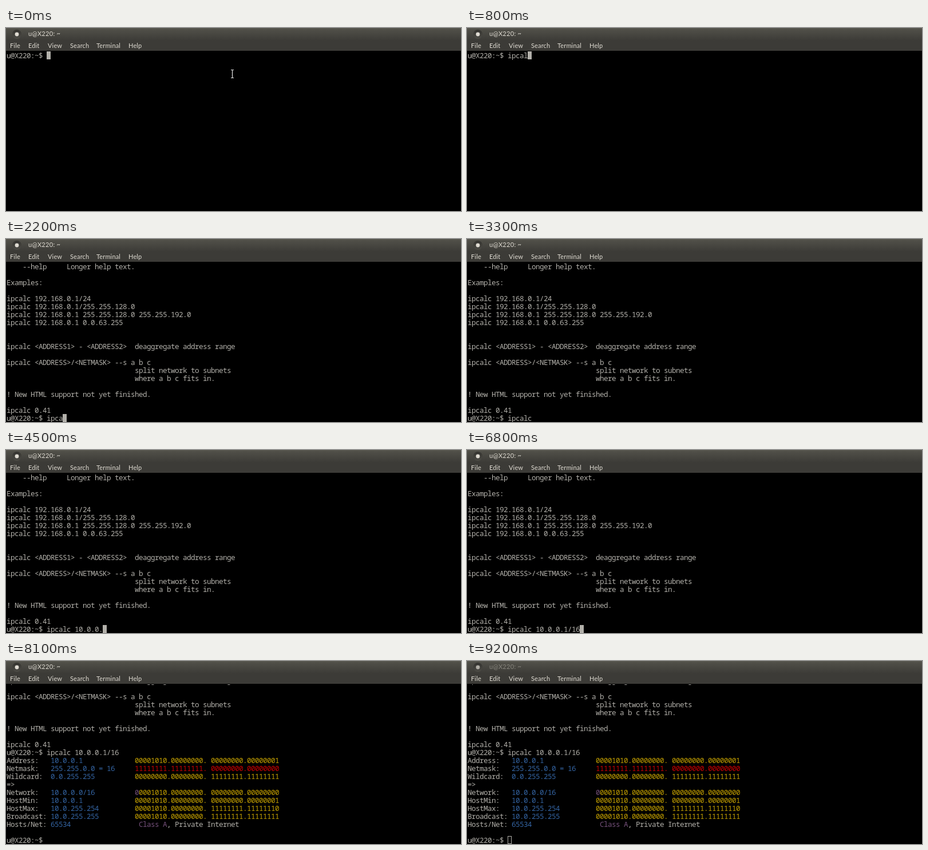
Animation, 795 px wide and 321 px high, one loop 9400 ms. Source, as an HTML page:

```html
<!DOCTYPE html>
<html lang="en">
<head>
<meta charset="utf-8">
<title>Terminal</title>
<style>
  html, body { margin: 0; width: 100%; height: 100%; overflow: hidden; background: #000; }
  svg { display: block; width: 795px; height: 321px; }
  .mono { font: 12.6px "Noto Sans Mono", "DejaVu Sans Mono", monospace; }
  .ui { font: 11px Lato, "Open Sans", sans-serif; letter-spacing: .15px; fill: #dfdbd2; }
</style>
</head>
<body>
<svg viewBox="0 0 795 321">
  <defs>
    <linearGradient id="bar" x1="0" y1="0" x2="0" y2="1">
      <stop offset="0" stop-color="#595850"/>
      <stop offset=".12" stop-color="#504f48"/>
      <stop offset="1" stop-color="#3c3b37"/>
    </linearGradient>
    <linearGradient id="knob" x1="0" y1="0" x2="0" y2="1">
      <stop offset="0" stop-color="#33322e"/>
      <stop offset="1" stop-color="#4d4c46"/>
    </linearGradient>
    <clipPath id="view"><rect y="41" width="795" height="280"/></clipPath>
  </defs>
  <rect width="795" height="321"/>
  <g class="mono" clip-path="url(#view)">
    <g id="start"></g>
    <g id="help"></g>
    <g id="result"></g>
    <rect id="cursor" width="7" height="14"/>
  </g>
  <rect width="795" height="40" fill="#3c3b37"/>
  <rect id="titlebar" width="795" height="22" fill="url(#bar)"/>
  <circle cx="19" cy="11" r="8" fill="url(#knob)"/>
  <circle id="dot" cx="19" cy="11" r="3.4" fill="#dfdbd2"/>
  <g class="ui">
    <text id="title" x="39" y="14" style="letter-spacing:.3px">u@X220: ~</text>
    <g id="menu"></g>
  </g>
  <g id="beam" fill="none">
    <path d="M-2.5 -7h2l.5 .5 .5 -.5h2M0 -6.5V6.5M-2.5 7h2l.5 -.5 .5 .5h2" stroke="#e6e6e6" stroke-width="1.2"/>
  </g>
  <path id="arrow" d="M0 0V15L3.6 11.7 6 17 8.4 16 6.1 10.9H11Z" fill="#fff" stroke="#000"/>
</svg>
<script>
const LOOP = 9400, CW = 7, LH = 14, TOP = 41;
const GREY = '#b2b0aa', BLUE = '#3465a4', GOLD = '#c4a000', RED = '#cc0000', PLUM = '#75507b';
const PROMPT = 'u@X220:~$ ';
const $ = id => document.getElementById(id);

function label(parent, x, y, text, fill) {
  const el = document.createElementNS('http://www.w3.org/2000/svg', 'text');
  el.setAttribute('x', x);
  el.setAttribute('y', y);
  if (fill) el.setAttribute('fill', fill);
  el.textContent = text;
  return parent.appendChild(el);
}

// Puts each word on the character grid.
function put(parent, row, col, text, fill = GREY) {
  for (const m of text.matchAll(/\S+/g)) {
    const xs = [...m[0]].map((_, i) => 1 + (col + m.index + i) * CW);
    label(parent, xs.join(' '), TOP + row * LH + 12, m[0], fill);
  }
}

function command(parent, row, text, times) {
  put(parent, row, 0, PROMPT);
  const chars = [...text].map((c, i) =>
    label(parent, 1 + (PROMPT.length + i) * CW, TOP + row * LH + 12, c, GREY));
  return { chars, times, row };
}

// Shows the typed part and returns its length.
function type({ chars, times }, t) {
  chars.forEach((c, i) => show(c, t >= times[i]));
  return times.filter(k => t >= k).length;
}

function show(el, on) { el.style.display = on ? '' : 'none'; }

[['File', 7], ['Edit', 39], ['View', 73], ['Search', 112], ['Terminal', 158], ['Help', 214]]
  .forEach(([name, x]) => label($('menu'), x, 35, name));

const indent = ' '.repeat(32);
`    --help     Longer help text.

Examples:

ipcalc 192.168.0.1/24
ipcalc 192.168.0.1/255.255.128.0
ipcalc 192.168.0.1 255.255.128.0 255.255.192.0
ipcalc 192.168.0.1 0.0.63.255


ipcalc <ADDRESS1> - <ADDRESS2>  deaggregate address range

ipcalc <ADDRESS>/<NETMASK> --s a b c
${indent}split network to subnets
${indent}where a b c fits in.

! New HTML support not yet finished.

ipcalc 0.41`.split('\n').forEach((line, row) => put($('help'), row, 0, line));

const first = command($('start'), 0, 'ipcalc', [300, 400, 500, 700, 800, 900]);
const second = command($('help'), 19, 'ipcalc 10.0.0.1/16',
  [1800, 2000, 2000, 2200, 2400, 2500, 2800, 3500, 3600, 3800, 4000,
   4300, 4400, 4500, 5300, 6200, 6500, 6800]);

const out = $('result');
const Z = '00000000', F = '11111111', TEN = '00001010';
[
  ['Address:', '10.0.0.1', [TEN, Z, Z, '00000001']],
  ['Netmask:', '255.255.0.0 = 16', [F, F, Z, Z], RED],
  ['Wildcard:', '0.0.255.255', [Z, Z, F, F]],
  ['=>'],
  ['Network:', '10.0.0.0/16', [TEN, Z, Z, Z]],
  ['HostMin:', '10.0.0.1', [TEN, Z, Z, '00000001']],
  ['HostMax:', '10.0.255.254', [TEN, Z, F, '11111110']],
  ['Broadcast:', '10.0.255.255', [TEN, Z, F, F]],
  ['Hosts/Net:', '65534']
].forEach(([name, value = '', bits, color = GOLD], i) => {
  const row = 9 + i;
  put(out, row, 0, name);
  put(out, row, 11, value, BLUE);
  if (!bits) return;
  const text = `${bits[0]}.${bits[1]}. ${bits[2]}.${bits[3]}`;
  const lead = name === 'Network:' ? 1 : 0;
  put(out, row, 32, text.slice(0, lead), PLUM);
  put(out, row, 32 + lead, text.slice(lead), color);
});
put(out, 17, 33, 'Class A', PLUM);
put(out, 17, 40, ', Private Internet');
put(out, 19, 0, PROMPT);

const blinks = [[3300, 3500], [5100, 5300], [5800, 6200], [7700, 8300], [8900, 9200]];

function drawCursor(t, row, typed, focused) {
  const c = $('cursor'), inset = focused ? 0 : .5;
  c.setAttribute('x', 1 + (PROMPT.length + typed) * CW + inset);
  c.setAttribute('y', TOP + row * LH + inset);
  c.setAttribute('width', CW - 2 * inset);
  c.setAttribute('height', LH - 2 * inset);
  c.setAttribute('fill', focused ? GREY : 'none');
  c.setAttribute('stroke', focused ? 'none' : GREY);
  show(c, !blinks.some(([a, b]) => t >= a && t < b));
}

function drawPointer(t) {
  const leaving = t >= 7500 && t < 8100;
  const p = leaving ? Math.floor((t - 7500) / 100) / 5 : 0;
  const x = 395.5 + 20 * p, y = 80.5 - 76 * p * (.6 + .4 * p);
  const visible = t < 200 || leaving;
  for (const id of ['beam', 'arrow']) {
    $(id).setAttribute('transform', `translate(${x} ${y})`);
    show($(id), visible && (id === 'beam') === (y > 40));
  }
}

function draw(t) {
  const listed = t >= 1200, done = t >= 7100, focused = t < 9200;
  show($('start'), !listed);
  show($('help'), listed);
  show(out, done);
  $('help').setAttribute('transform', `translate(0 ${done ? -11 * LH : 0})`);
  const a = type(first, t), b = type(second, t);
  drawCursor(t, listed ? 19 : 0, done ? 0 : listed ? b : a, focused);
  drawPointer(t);
  $('title').setAttribute('fill', focused ? '#dfdbd2' : '#87857d');
  $('dot').setAttribute('fill', focused ? '#dfdbd2' : '#b0ada5');
}

const begin = performance.now();
function tick() {
  draw((performance.now() - begin) % LOOP);
  requestAnimationFrame(tick);
}
tick();
</script>
</body>
</html>
```
